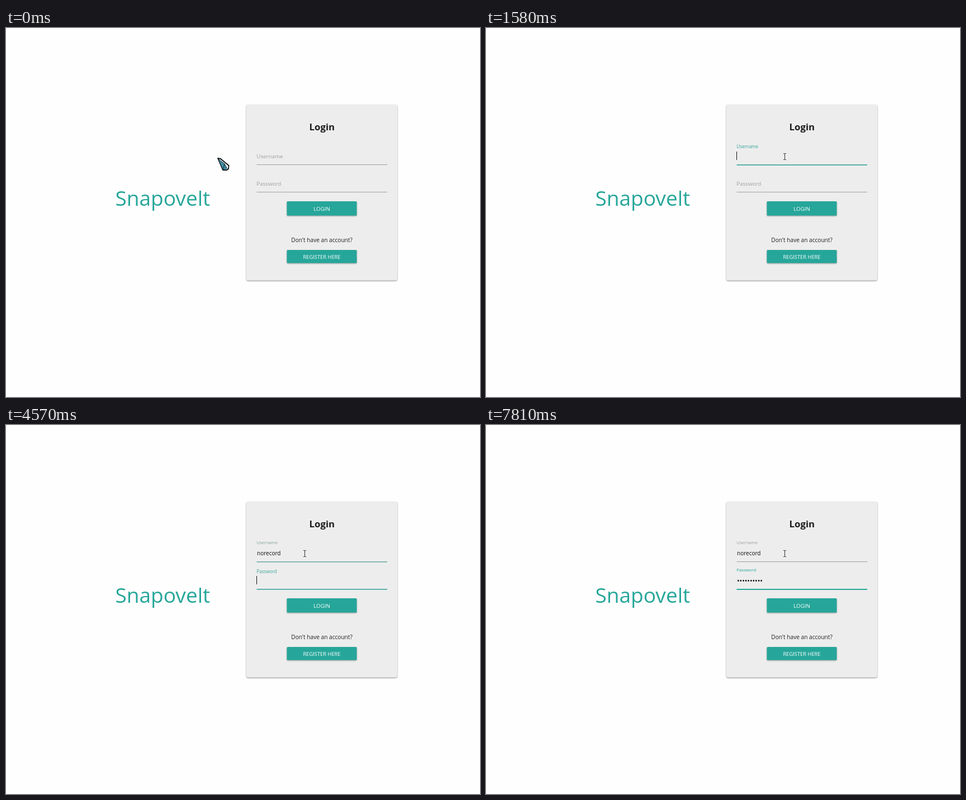
These frames come from a looping animation (848 px wide and 660 px high, 8 s). An HTML page:

```html
<!DOCTYPE html>
<html lang="en">
<head>
<meta charset="utf-8">
<title>Login form</title>
<style>
  html, body { margin: 0; height: 100%; overflow: hidden; background: #fefefe; }
  svg { display: block; width: 848px; height: 660px; font-family: "Open Sans", "Noto Sans", sans-serif; }
  .card { fill: #ededed; filter: drop-shadow(0 1px 1px rgba(0, 0, 0, .45)); }
  .button rect { fill: #26a69a; filter: drop-shadow(0 1px 1px rgba(0, 0, 0, .35)); }
  .button text { fill: #fff; }
  .middle { text-anchor: middle; }
  .ibeam { fill: none; stroke: #333; }
</style>
</head>
<body>
<svg viewBox="0 0 848 660">
  <text x="195.5" y="318" font-size="37" fill="#26a69a">Snapovelt</text>
  <rect class="card" x="430" y="137" width="270" height="314.5" rx="3.5"/>
  <g class="middle">
    <text x="565.3" y="183" font-size="16.8" font-weight="700" fill="#1c1c1c">Login</text>
    <text x="565" y="383" font-size="10.15" fill="#222">Don't have an account?</text>
    <g class="button">
      <rect x="502.5" y="310" width="125" height="25.5" rx="1.5"/>
      <text x="565" y="326.5" font-size="9.7">LOGIN</text>
      <rect x="502.5" y="397" width="125" height="23.5" rx="1.5"/>
      <text x="565" y="412.7" font-size="9.35">REGISTER HERE</text>
    </g>
  </g>
  <g id="fields"></g>
  <path id="caret" fill="#111" d="M0 0h1v15h-1z"/>
  <g id="arrow" stroke-linejoin="round">
    <path d="M1 1L6 2L20.500 14L20 20L17 22L10 22Z" fill="#fff" stroke="#0b0f12" stroke-width="1.8"/>
    <path d="M2 2.500L10.500 21.500L18 20L13 11Z" fill="#3d8ba3"/>
    <path d="M2 2.500L13 11L10.500 21.500M13 11L18 20" fill="none" stroke="#10262e"/>
  </g>
  <path id="ibeam" class="ibeam" d="M-2.500 -5.500h2l.5 .5l.5 -.5h2M0 -5v10M-2.500 5.500h2l.5 -.5l.5 .5h2"/>
</svg>
<script>
const LOOP = 8000;
const MOVE_START = 915, MOVE_END = 1430;
const GRAY = [158, 158, 158], TEAL = [38, 166, 154];
const byId = id => document.getElementById(id);
const clamp = v => Math.min(1, Math.max(0, v));
const mix = (a, b, p) => a + (b - a) * p;
const tint = p => `rgb(${GRAY.map((g, i) => mix(g, TEAL[i], p))})`;
const easeOut = p => 1 - (1 - clamp(p)) ** 1.9;

function add(tag, attributes) {
  const node = document.createElementNS("http://www.w3.org/2000/svg", tag);
  set(node, attributes);
  return byId("fields").appendChild(node);
}
function set(node, attributes) {
  for (const name in attributes) node.setAttribute(name, attributes[name]);
}

// A repeated key time types two characters at once.
const fields = [
  { label: "Username", value: "norecord", y: 233.3, size: 10, focus: 1445, blur: 4460,
    keys: [2200, 2450, 2580, 2990, 3560, 3650, 3830, 3960] },
  { label: "Password", value: "•".repeat(10), y: 282, size: 12.2, focus: 4450, blur: Infinity,
    keys: [5310, 5400, 5570, 5970, 5970, 6450, 6590, 6670, 7100, 7220] }
];
for (const field of fields) {
  field.line = add("rect", { x: 448.5, y: Math.round(field.y + 11), width: 233.5, height: 1 });
  field.glow = add("rect", { x: 448.5, y: Math.round(field.y + 12), width: 233.5, height: 1, fill: tint(1) });
  field.title = add("text", { "font-size": 9.75 });
  field.title.textContent = field.label;
  field.text = add("text", { x: 449, y: field.y + (field.size > 11 ? 1 : 0), "font-size": field.size, fill: "#111" });
}
const caretResets = [1445, 1520, 4450, ...fields.flatMap(field => field.keys)];

function drawField(field, t) {
  const active = duration => easeOut((t - field.focus - 5) / duration) - easeOut((t - field.blur) / duration);
  const lift = easeOut((t - field.focus) / 200);
  set(field.title, {
    transform: `translate(448.3 ${field.y - 20.3 * lift}) scale(${1 - 0.2 * lift})`,
    fill: tint(active(200))
  });
  set(field.line, { fill: tint(active(260)) });
  set(field.glow, { opacity: active(300) });
  field.text.textContent = field.value.slice(0, field.keys.filter(key => key <= t).length);
}

function drawCaret(t) {
  const lastReset = Math.max(...caretResets.filter(time => time <= t));
  const field = fields[t < fields[1].focus ? 0 : 1];
  const width = field.text.textContent ? field.text.getComputedTextLength() : -1;
  set(byId("caret"), {
    transform: `translate(${Math.round(449 + width)} ${Math.round(field.y - 12)})`,
    opacity: t - lastReset < 590 ? 1 : 0
  });
}

function drawPointer(t) {
  const p = 1 - (1 - clamp((t - MOVE_START) / (MOVE_END - MOVE_START))) ** 1.6;
  const x = Math.round(mix(378, 534, p)), y = Math.round(mix(232, 230, p));
  const overField = x >= 448;
  set(byId("arrow"), { transform: `translate(${x} ${y})`, opacity: overField ? 0 : 1 });
  set(byId("ibeam"), { transform: `translate(${x + 0.5} ${y})`, opacity: overField ? 1 : 0 });
}

function draw(now) {
  const t = now % LOOP;
  for (const field of fields) drawField(field, t);
  drawCaret(t);
  drawPointer(t);
  const heavier = t >= 1450 && t < 1800;
  set(document.querySelector(".button"), { "font-weight": heavier ? 500 : 400 });
  requestAnimationFrame(draw);
}
draw(0);
</script>
</body>
</html>
```
